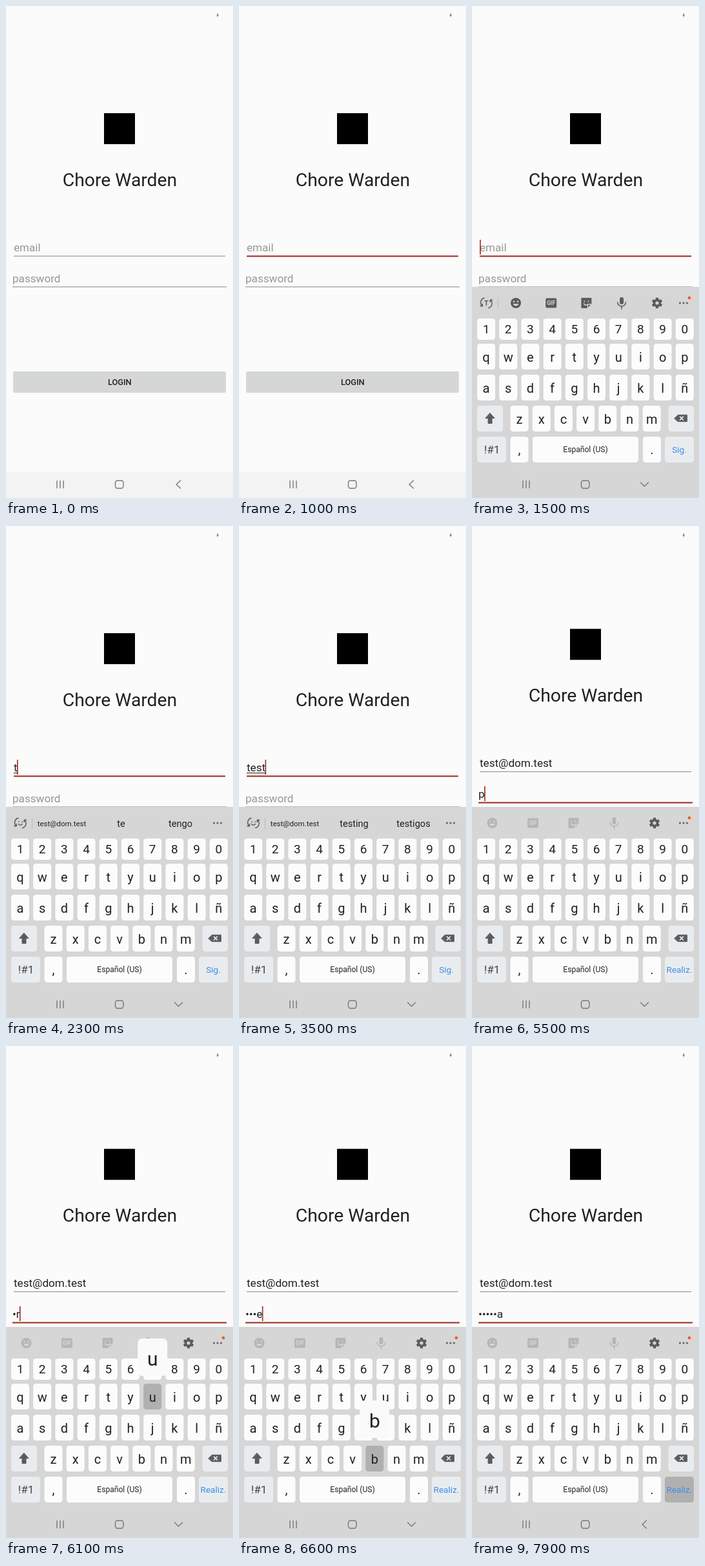
Recreate the animation shown at these times as an HTML page. Size 352x762 px, loop 8000 ms.

```html
<!DOCTYPE html>
<html lang="es">
<head>
<meta charset="utf-8">
<title>Login</title>
<style>
  html, body { margin: 0; width: 100%; height: 100%; overflow: hidden; background: #fbfbfb; }
  svg { display: block; width: 352px; height: 762px; font-family: Roboto, Arial, sans-serif; }
  text { white-space: pre; }
</style>
</head>
<body>
<svg id="stage" viewBox="0 0 352 762"></svg>
<script>
const LOOP = 8000;
const EMAIL = 'test@dom.test';
const RED = '#9c2a22', INK = '#202020', BOARD = '#d6d6d6', ICON = '#5c5c5c', PALE = '#b6b6b6';
const stage = document.getElementById('stage');

function add(parent, tag, attrs = {}, content) {
  const node = document.createElementNS('http://www.w3.org/2000/svg', tag);
  set(node, attrs);
  if (content !== undefined) node.textContent = content;
  parent.appendChild(node);
  return node;
}
function set(node, attrs) {
  for (const name in attrs) node.setAttribute(name, attrs[name]);
}
const group = (parent, attrs) => add(parent, 'g', attrs);
const rect = (parent, x, y, width, height, fill, rx = 0) =>
  add(parent, 'rect', { x, y, width, height, fill, rx });
const path = (parent, d, stroke, width = 1.5, fill = 'none') =>
  add(parent, 'path', { d, stroke, fill, 'stroke-width': width, 'stroke-linecap': 'round', 'stroke-linejoin': 'round' });
const label = (parent, x, y, size, content, attrs = {}) =>
  add(parent, 'text', { x, y, 'font-size': size, fill: INK, 'text-anchor': 'middle', ...attrs }, content);
const show = (node, on) => node.setAttribute('visibility', on ? 'visible' : 'hidden');

// Last row of a [time, value, ...] table that has begun
function at(table, t) {
  let row = table[0];
  for (const next of table) if (next[0] <= t) row = next;
  return row;
}

// ---- Timeline ----
const emailSteps = [[0, ''], [2300, 't'], [2600, 'te'], [3100, 'tes'], [3500, 'test'], [4000, EMAIL]];
const passSteps = [[0, ''], [5400, 'p'], [5900, '•r'], [6200, '••u'], [6500, '•••e'], [6700, '••••b'], [7000, '•••••a']];
const presses = [
  ['t', 2200, 2300], ['e', 2500, 2600], ['s', 3000, 3100], ['t', 3200, 3500],
  ['p', 5300, 5500], ['r', 5800, 5900], ['u', 6100, 6200], ['e', 6400, 6500],
  ['b', 6600, 6700], ['a', 6900, 7100]
];
const words = [
  [0, '', '', ''], [2300, EMAIL, 'te', 'tengo'], [2800, EMAIL, 'testing', 'testigos'],
  [4000, 'como', 'con', 'compañero']
];
const lifts = [[0, 0], [4600, -2], [4700, -5], [4800, -6.7]];
const slide = [[0, 330], [1100, 235], [1200, 105], [1300, 30], [1400, 0]];
const FOCUS_EMAIL = 1000, FOCUS_PASS = 4400, SECURE = 4900, DONE = 7700, CLOSE = 7900;

// ---- Login page ----
rect(stage, 0, 0, 352, 762, '#fbfbfb');
path(stage, 'M328.5 11.8 L327 14.2 H329.3 L328 16.4', '#444', 0.9);
const page = group(stage);
rect(page, 152, 166, 48, 48, '#000');
label(page, 176.5, 278.5, 28.3, 'Chore Warden');

function makeField(x, base, right, hint) {
  const line = rect(page, x, 0, right - x, 1, '#858585');
  return {
    x, base, line,
    hint: label(page, x, base, 17.1, hint, { fill: '#979797', 'text-anchor': 'start' }),
    text: label(page, x, base, 17.1, '', { 'text-anchor': 'start' }),
    caret: rect(page, x, base - 18, 1.6, 23, RED)
  };
}
const email = makeField(12, 380, 340, 'email');
const pass = makeField(10, 427.7, 342, 'password');
const composing = rect(page, 12, 382, 29, 1, INK);

rect(stage, 11, 566, 330, 33, '#d5d6d6', 2);
label(stage, 176.3, 587, 12.8, 'LOGIN', { 'font-weight': 500 });

// ---- Keyboard ----
const board = group(stage);
rect(board, 0, 435, 352, 327, BOARD);
const keys = {};
function key(name, x, y, w, h, fill = '#fcfcfc') {
  keys[name] = { x: x + w / 2, y, fill, node: rect(board, x, y, w, h, fill, 4.5) };
}
function keyRow(chars, x, y, h, size, base) {
  [...chars].forEach((c, i) => {
    const left = x + i * 34.2;
    key(c, left, y, 28, h);
    label(board, left + 14, base, size, c);
  });
}
keyRow('1234567890', 8, 484, 33, 19, 506.5);
keyRow('qwertyuiop', 8, 523, 40, 20, 550.5);
keyRow('asdfghjklñ', 8, 571, 40, 20, 598.5);
keyRow('zxcvbnm', 59.5, 619, 40, 20, 646.5);
const SPECIAL = '#e9ecef';
key('shift', 8, 619, 40, 40, SPECIAL);
key('back', 304.5, 619, 39.5, 40, SPECIAL);
key('sym', 8, 667, 45, 40, SPECIAL);
key('comma', 59.5, 667, 28, 40);
key('space', 94, 667, 164, 40);
key('dot', 265, 667, 28, 40);
key('go', 299, 667, 45, 40, SPECIAL);
path(board, 'M28 630.5 L35 638.5 H31 V646.5 H25 V638.5 H21 Z', ICON, 1, ICON);
path(board, 'M314 638.5 L319.5 633.3 H333.5 V643.7 H319.5 Z', ICON, 1, ICON);
path(board, 'M322.5 636 l5 5 m0 -5 l-5 5', '#fff', 1.5);
label(board, 31, 693, 17, '!#1', { fill: '#444' });
label(board, 73.5, 694, 20, ',');
label(board, 279, 694, 20, '.');
label(board, 176, 691, 12.1, 'Español (US)');
const goLabel = label(board, 321.5, 692, 13.6, 'Sig.', { fill: '#3f8ee8' });

// ---- Toolbar ----
function smiley(parent, x, color) {
  add(parent, 'circle', { cx: x, cy: 460, r: 8, fill: color });
  add(parent, 'circle', { cx: x - 3, cy: 457.7, r: 1.3, fill: BOARD });
  add(parent, 'circle', { cx: x + 3, cy: 457.7, r: 1.3, fill: BOARD });
  path(parent, `M${x - 4.3} 461.3 a4.4 4 0 0 0 8.6 0 Z`, 'none', 0, BOARD);
}
function gifIcon(parent, x, color) {
  rect(parent, x - 8.5, 452.5, 17, 15, color, 2);
  label(parent, x, 463.2, 8.5, 'GIF', { fill: BOARD, 'font-weight': 700 });
}
function sticker(parent, x, color) {
  path(parent, `M${x - 7} 453 h14 v8 l-6 6 h-8 Z`, color, 2, color);
  path(parent, `M${x + 2} 468 v-6 h6`, BOARD, 1.3);
  path(parent, `M${x - 3} 457 v1 m6 -1 v1 m-7 3 q2 3 5 2`, BOARD, 1.4);
}
function mic(parent, x, color) {
  rect(parent, x - 3, 451, 6, 11, color, 3);
  path(parent, `M${x - 6.3} 459 a6.3 6 0 0 0 12.6 0 M${x} 465 v4`, color, 1.6);
}
function gear(parent, x, color) {
  add(parent, 'circle', { cx: x, cy: 460, r: 4.4, fill: 'none', stroke: color, 'stroke-width': 3.6 });
  for (let a = 0; a < 360; a += 60)
    set(rect(parent, x - 2.2, 451.8, 4.4, 4, color, 0.8), { transform: `rotate(${a} ${x} 460)` });
}
function cycle(parent) {
  path(parent, 'M19 452.5 h-1 a7.5 7.5 0 0 0 -2.5 12 m-2.5 .3 h3.3 v-3.3', ICON, 1.4);
  path(parent, 'M25.5 467.5 h1 a7.5 7.5 0 0 0 2.5 -12 m2.5 -.3 h-3.3 v3.3', ICON, 1.4);
}
function tools(parent, x, gap, color) {
  [smiley, gifIcon, sticker, mic].forEach((draw, i) => draw(parent, x + i * gap, color));
}
const divider = rect(board, 40, 452, 1, 17, '#bcbcbc');
const swap = group(board);
cycle(swap);
const iconBar = group(board);
tools(iconBar, 68, 54.7, ICON);
gear(iconBar, 287, ICON);
label(iconBar, 22.3, 464, 10.5, 'T', { fill: ICON, 'font-weight': 700 });
const secureBar = group(board);
tools(secureBar, 31.5, 63, PALE);
gear(secureBar, 283, ICON);
const wordBar = group(board);
path(wordBar, 'M20 457.8 v.6 M25 457.8 v.6 M19.3 461.5 q3 3.5 6 0', ICON, 1.4);
const wordNodes = [86.5, 178.5, 270.5].map(x => label(wordBar, x, 465.5, 14.6, ''));
[322.5, 328, 333.5].forEach(cx => add(board, 'circle', { cx, cy: 460, r: 1.6, fill: '#6d6060' }));
const badge = add(board, 'circle', { cx: 337, cy: 452, r: 2.3, fill: '#f0590c' });

// ---- Key preview ----
const popup = group(board);
rect(popup, -23, 0, 46, 58, '#fafafa', 7);
const popupText = label(popup, 0, 42, 30, '');

// ---- Navigation bar ----
const navBack = rect(stage, 0, 722, 352, 40, '#f3f3f3');
path(stage, 'M79 735.5 v11 M84 735.5 v11 M89 735.5 v11', '#777', 1.4);
add(stage, 'rect', { x: 169.5, y: 735, width: 12.5, height: 12, rx: 3.5, fill: 'none', stroke: '#777', 'stroke-width': 1.4 });
const navLeft = path(stage, 'M270.5 735 L264 741 L270.5 747', '#777', 1.4);
const navDown = path(stage, 'M261.5 738 L267.5 744 L273.5 738', '#777', 1.4);

function updateField(field, steps, t, focusFrom, focusTo) {
  const [edited, text] = at(steps, t);
  const focused = t >= focusFrom && t < focusTo;
  if (field.text.textContent !== text) field.text.textContent = text;
  show(field.hint, !text);
  set(field.line, {
    y: field.base + (focused ? 6.5 : 6.8), height: focused ? 2 : 1, fill: focused ? RED : '#858585'
  });
  // The blink restarts with each edit
  const since = t - Math.max(edited, focusFrom + 100);
  show(field.caret, focused && Math.floor(since / 500) % 2 === 0);
  field.caret.setAttribute('x', field.x + (text ? field.text.getComputedTextLength() - 0.6 : 0));
}

function updateKeys(t) {
  for (const name in keys) keys[name].node.setAttribute('fill', keys[name].fill);
  const press = presses.find(([, from, to]) => t >= from && t < to);
  show(popup, !!press);
  if (press) {
    const { x, y, node } = keys[press[0]];
    node.setAttribute('fill', '#b0b0b0');
    popupText.textContent = press[0];
    const left = Math.min(321, Math.max(30, x));
    popup.setAttribute('transform', `translate(${left} ${y - 70})`);
  }
  if (t >= DONE) keys.go.node.setAttribute('fill', '#b0b0b0');
  goLabel.textContent = t >= SECURE ? 'Realiz.' : 'Sig.';
}

function updateToolbar(t) {
  const secure = t >= SECURE;
  const [, ...list] = at(words, t);
  const suggesting = !!list[0] && !secure;
  show(iconBar, !suggesting && !secure);
  show(wordBar, suggesting);
  show(secureBar, secure);
  show(swap, !secure);
  show(divider, !secure);
  show(badge, !suggesting);
  wordNodes.forEach((node, i) => {
    node.textContent = list[i];
    const long = list[i] === EMAIL;
    set(node, { 'font-size': long ? 11.5 : 14.6, y: long ? 464.5 : 465.5 });
  });
}

function render(t) {
  page.setAttribute('transform', `translate(0 ${at(lifts, t)[1]})`);
  updateField(email, emailSteps, t, FOCUS_EMAIL, FOCUS_PASS);
  updateField(pass, passSteps, t, FOCUS_PASS, LOOP);
  show(composing, t >= 2300 && t < 4000);
  if (t >= 2300 && t < 4000) composing.setAttribute('width', email.text.getComputedTextLength());

  board.setAttribute('transform', `translate(0 ${at(slide, t)[1]})`);
  updateKeys(t);
  updateToolbar(t);

  const open = t >= 1100;
  navBack.setAttribute('fill', open ? BOARD : '#f3f3f3');
  show(navDown, open && t < CLOSE);
  show(navLeft, !open || t >= CLOSE);
}

const start = performance.now();
function frame() {
  const t = (performance.now() - start) % LOOP;
  render(Math.floor(t / 100) * 100);
  requestAnimationFrame(frame);
}
frame();
</script>
</body>
</html>
```
